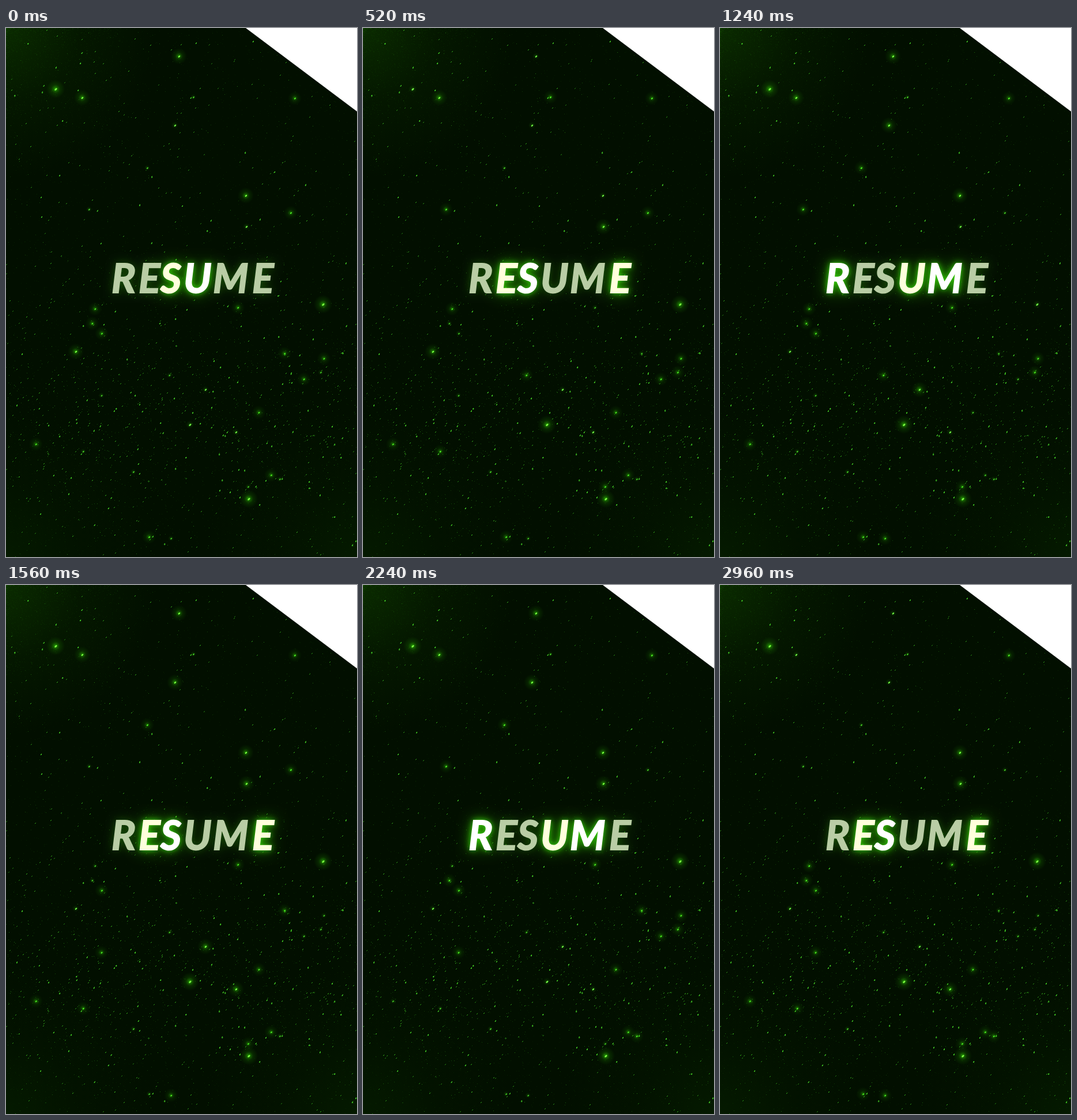
Write an HTML page with a canvas that moves like this. It is 609 by 919 pixels and loops after 3000 ms.

```html
<!DOCTYPE html>
<html lang="en">
<head>
<meta charset="utf-8">
<title>Resume</title>
<style>
  html, body { margin: 0; width: 100%; height: 100%; overflow: hidden; background: #020f00; }
  canvas { display: block; width: 609px; height: 919px; }
</style>
</head>
<body>
<canvas id="stage" width="609" height="919"></canvas>
<script>
const W = 609, H = 919, STEP = 40, STEPS = 75;
const ctx = document.getElementById('stage').getContext('2d');

// Brightest stars first; the rest are scattered by chance
const bright = [
  [550, 480], [319, 689], [86, 106], [421, 818], [293, 169], [300, 49],
  [399, 702], [121, 562], [346, 628], [416, 291], [417, 345], [132, 121],
  [325, 120], [501, 122], [245, 243], [494, 321], [144, 315], [221, 771]
];
const SCATTERED = 18;

// Letter, left edge of its ink
const letters = [['R', 184], ['E', 231], ['S', 266], ['U', 311], ['M', 360], ['E', 428]];
const BASELINE = 460;
const CREAM = '#ffffdc', WHITE = '#ffffff', DIM = '#b9cda5';
const poses = [
  { 2: CREAM, 3: WHITE },
  { 0: WHITE, 3: CREAM, 4: WHITE },
  { 1: CREAM, 2: WHITE, 5: CREAM }
];
const poseOrder = [0, 1, 1, 2, 2];

function seeded(seed) {
  return () => {
    seed = (seed + 0x6D2B79F5) | 0;
    let t = Math.imul(seed ^ (seed >>> 15), 1 | seed);
    t = (t + Math.imul(t ^ (t >>> 7), 61 | t)) ^ t;
    return ((t ^ (t >>> 14)) >>> 0) / 4294967296;
  };
}

function makeTwinklers() {
  const rnd = seeded(5);
  const stars = bright.map(([x, y], i) => ({ x, y, size: i < 4 ? 3 : i < 12 ? 2 : 1 }));
  for (let i = 0; i < SCATTERED; i++) {
    stars.push({ x: W * rnd(), y: 480 + 410 * rnd(), size: 1 });
  }
  return stars;
}

function wash(c, x, y, r, rgb, alpha) {
  const g = c.createRadialGradient(x, y, 0, x, y, r);
  g.addColorStop(0, `rgba(${rgb},${alpha})`);
  g.addColorStop(0.5, `rgba(${rgb},${alpha * 0.3})`);
  g.addColorStop(1, `rgba(${rgb},0)`);
  c.fillStyle = g;
  c.fillRect(x - r, y - r, 2 * r, 2 * r);
}

function streak(c, x, y, size, color) {
  c.save();
  c.translate(x + 0.5, y + 0.5);
  c.rotate(-0.75);
  c.fillStyle = color;
  c.beginPath();
  c.ellipse(0, 0, 1.3 + size * 0.7, 0.7 + size * 0.3, 0, 0, 7);
  c.fill();
  c.restore();
}

function makeSky() {
  const sky = document.createElement('canvas');
  sky.width = W;
  sky.height = H;
  const c = sky.getContext('2d');
  const rnd = seeded(11);
  c.fillStyle = '#020f00';
  c.fillRect(0, 0, W, H);
  wash(c, 0, 0, 260, '18,70,0', 0.5);
  wash(c, 0, H, 260, '10,50,0', 0.3);
  wash(c, W, H, 260, '10,50,0', 0.3);

  // Soft grain, denser in the top left corner
  for (let i = 0; i < 6000; i++) {
    const corner = i < 1200;
    const x = corner ? 200 * rnd() ** 2 : W * rnd();
    const y = corner ? 160 * rnd() ** 2 : H * rnd();
    c.fillStyle = `rgba(30,110,0,${0.08 + 0.15 * rnd()})`;
    c.fillRect(x | 0, y | 0, 1, 1);
  }
  // Faint stars, gathered in a band across the lower half
  for (let i = 0; i < 2500; i++) {
    const x = W * rnd();
    const y = i < 1200 ? H * rnd() : 665 + (rnd() + rnd() + rnd() - 1.5) * 220;
    const v = rnd() ** 2;
    c.fillStyle = `rgba(${45 + 30 * v | 0},${150 + 80 * v | 0},${20 + 20 * v | 0},${0.3 + 0.6 * v})`;
    c.fillRect(x | 0, y | 0, 1, 1);
    if (v > 0.5) c.fillRect((x | 0) + 1, (y | 0) - 1, 1, 1);
    if (v > 0.9) streak(c, x, y, 0.1, '#45cf26');
  }
  for (const { x, y, size } of twinklers) {
    wash(c, x, y, 4 + size, '50,190,10', 0.35);
    streak(c, x, y, size * 0.6, size > 1 ? '#74fa48' : '#4bd92a');
  }
  return sky;
}

// Halo only: the glyph itself is painted off stage
function halo(ch, x, blur, color) {
  ctx.save();
  ctx.shadowColor = color;
  ctx.shadowBlur = blur;
  ctx.shadowOffsetX = 2000;
  ctx.fillStyle = '#000';
  ctx.fillText(ch, x - 2000, BASELINE);
  ctx.restore();
}

function drawWord(pose) {
  ctx.font = 'italic 700 70px Lato, "Open Sans", sans-serif';
  ctx.lineWidth = 2;
  const placed = letters.map(([ch, left], i) => ({
    ch, x: left + 1 + ctx.measureText(ch).actualBoundingBoxLeft, color: pose[i]
  }));
  for (const { ch, x, color } of placed) {
    if (!color) halo(ch, x, 16, 'rgba(45,150,5,0.6)');
  }
  for (const { ch, x, color } of placed) {
    if (!color) continue;
    halo(ch, x, 24, 'rgba(50,230,0,0.8)');
    halo(ch, x, 11, '#42f000');
  }
  for (const { ch, x, color } of placed) {
    ctx.fillStyle = ctx.strokeStyle = color || DIM;
    ctx.fillText(ch, x, BASELINE);
    ctx.strokeText(ch, x, BASELINE);
  }
}

function drawCorner() {
  ctx.fillStyle = '#fff';
  ctx.beginPath();
  ctx.moveTo(416, 0);
  ctx.lineTo(W, 0);
  ctx.lineTo(W, 145);
  ctx.fill();
}

const twinklers = makeTwinklers();
const sky = makeSky();

function draw(now) {
  const step = Math.floor((now + 0.5) / STEP) % STEPS;
  ctx.drawImage(sky, 0, 0);
  ctx.globalCompositeOperation = 'lighter';
  twinklers.forEach(({ x, y, size }, i) => {
    const chance = 0.45 + size * 0.12;
    if (seeded(i * 977 + step * 131)() > chance) return;
    wash(ctx, x, y, 10 + size * 2, '35,150,0', 0.25 + size * 0.1);
  });
  ctx.globalCompositeOperation = 'source-over';
  drawWord(poses[poseOrder[step % 5]]);
  drawCorner();
  requestAnimationFrame(draw);
}
requestAnimationFrame(draw);
</script>
</body>
</html>
```
